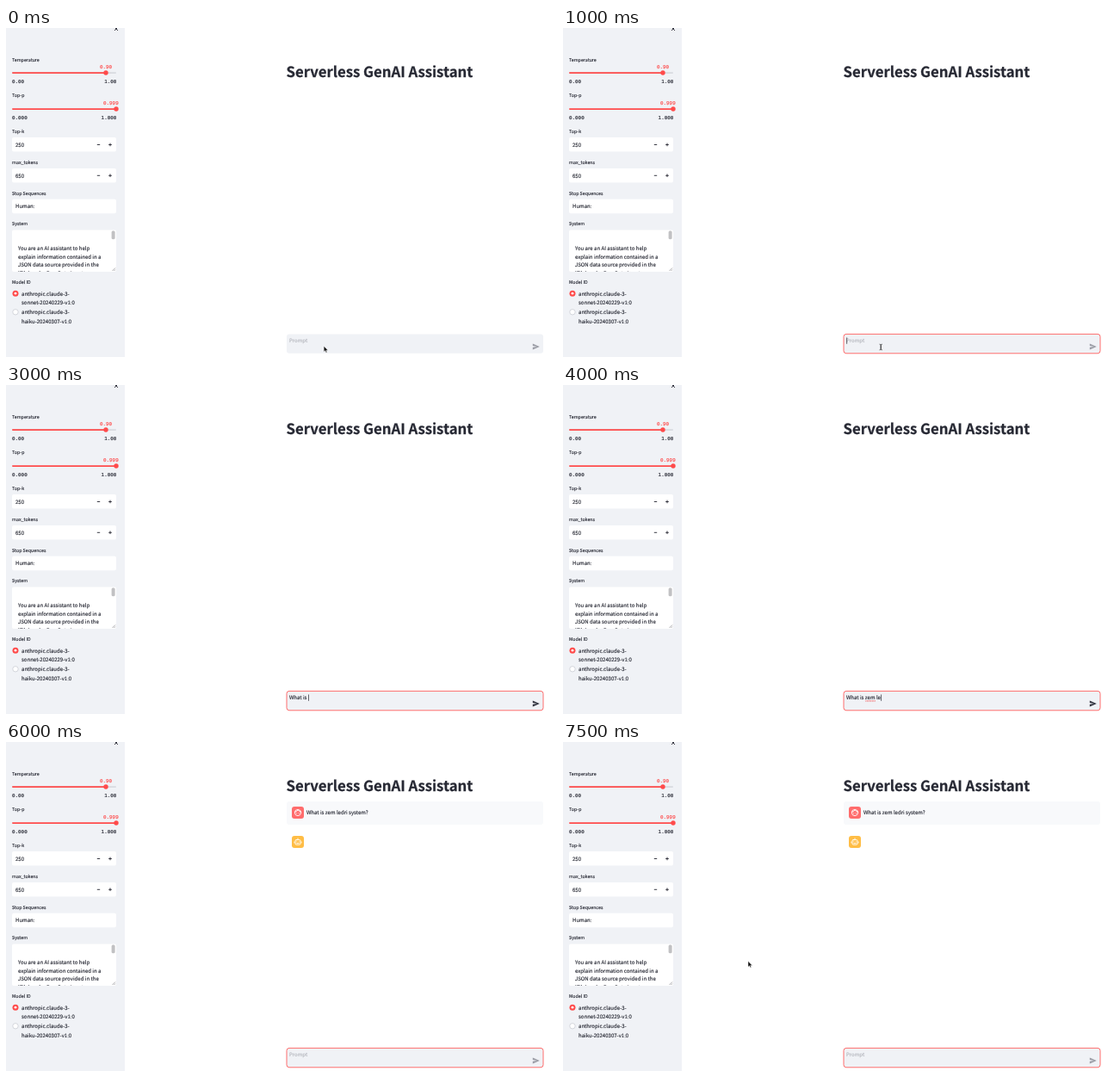
Write an HTML page that moves like this. It is 640x382 px and loops after 8000 ms.

```html
<!DOCTYPE html>
<html lang="en">
<head>
<meta charset="utf-8">
<title>Serverless GenAI Assistant</title>
<style>
  html, body { margin: 0; width: 100%; height: 100%; overflow: hidden; background: #fff; }
  svg { display: block; width: 100%; height: 100%; }
  text {
    font: 6.06px "Noto Sans CJK JP", "Noto Sans CJK SC", "Noto Sans CJK", "Open Sans", sans-serif;
    fill: #262833;
    stroke: #262833;
    stroke-width: .14;
    text-rendering: geometricPrecision;
    white-space: pre;
  }
  .title { font-size: 16.75px; font-weight: 700; letter-spacing: -.02px; stroke-width: .25; }
  .label text { font-size: 5.3px; }
  .num text { font: 5.9px "Liberation Mono", "Noto Sans Mono", monospace; }
  .num .hot { fill: #ff4b4b; stroke: #ff4b4b; }
  .end { text-anchor: end; }
  .panel { fill: #f0f2f6; }
  .field { fill: #fff; }
  .red { fill: #ff4b4b; }
  .sign { stroke: #262833; stroke-width: .9; fill: none; }
  .face { stroke: #fff; stroke-width: .9; fill: none; stroke-linecap: round; }
  .hint { fill: #a0a2aa; stroke: none; }
</style>
</head>
<body>
<svg viewBox="0 0 640 382" xmlns="http://www.w3.org/2000/svg">
  <defs>
    <clipPath id="area"><rect x="7" y="234.5" width="121" height="48.5"/></clipPath>
    <path id="arrow" d="M0 0V6.6L1.6 5.2 2.6 7.5 3.7 7 2.7 4.8H4.8Z" fill="#111" stroke="#fff" stroke-width=".4"/>
  </defs>

  <!-- sidebar -->
  <rect class="panel" width="138" height="382"/>
  <path class="sign" d="M126 -1l4 4M130 -1l-4 4"/>
  <g class="label">
    <text x="7" y="38.6">Temperature</text>
    <text x="7" y="80.1">Top-p</text>
    <text x="7" y="121.9">Top-k</text>
    <text x="7" y="157.8">max_tokens</text>
    <text x="7" y="193.8">Stop Sequences</text>
    <text x="7" y="229.3">System</text>
    <text x="7" y="297.3">Model ID</text>
  </g>

  <rect x="7" y="51.2" width="121" height="1.7" rx=".8" fill="#d8dae0"/>
  <rect class="red" x="7" y="51.2" width="109" height="1.7" rx=".8"/>
  <circle class="red" cx="116" cy="52" r="2.7"/>
  <rect class="red" x="7" y="93.2" width="121" height="1.7" rx=".8"/>
  <circle class="red" cx="128" cy="94" r="2.7"/>
  <g class="num">
    <text class="hot" x="109" y="47.2">0.90</text>
    <text x="7" y="63.8">0.00</text>
    <text class="end" x="128.3" y="63.8">1.00</text>
    <text class="hot" x="113" y="89">0.999</text>
    <text x="7" y="105.8">0.000</text>
    <text class="end" x="128.3" y="105.8">1.000</text>
  </g>

  <g class="field">
    <rect x="7" y="127" width="121" height="16.5" rx="2"/>
    <rect x="7" y="163" width="121" height="16.5" rx="2"/>
    <rect x="7" y="198.7" width="121" height="16.5" rx="2"/>
    <rect x="7" y="234.5" width="121" height="48.5" rx="2"/>
  </g>
  <text x="11" y="137.8">250</text>
  <text x="11" y="173.7">650</text>
  <text x="11" y="209.4">Human:</text>
  <path class="sign" d="M105.8 135.5h3.4M119.2 135.5h3.6M121 133.7v3.6M105.8 171.3h3.4M119.2 171.3h3.6M121 169.5v3.6"/>

  <g clip-path="url(#area)">
    <text x="14" y="258.2">You are an AI assistant to help</text>
    <text x="14" y="267.8">explain information contained in a</text>
    <text x="14" y="277.4">JSON data source provided in the</text>
    <text x="14" y="286.6">'File' under Raw Data Input</text>
  </g>
  <rect x="122.6" y="235.6" width="4" height="9.6" rx="1.5" fill="#c1c1c3"/>
  <path d="M123.5 282l3.5-3.5M125.5 282l1.5-1.5" stroke="#77787c" stroke-width=".6"/>

  <circle class="red" cx="11" cy="308.2" r="3.5"/>
  <circle class="field" cx="11" cy="308.2" r="1.4"/>
  <circle class="field" cx="11" cy="329.8" r="3.2" stroke="#c3c6ce" stroke-width=".7"/>
  <text x="18" y="310.7">anthropic.claude-3-</text>
  <text x="18" y="321.3">sonnet-20240229-v1:0</text>
  <text x="18" y="332.2">anthropic.claude-3-</text>
  <text x="18" y="342.8">haiku-20240307-v1:0</text>

  <!-- conversation -->
  <text class="title" x="325.6" y="56.8">Serverless GenAI Assistant</text>
  <g id="chat">
    <rect x="326" y="69" width="298" height="27" rx="3" fill="#f8f9fb"/>
    <rect x="332" y="75" width="14" height="14" rx="3" fill="#ff6c6c"/>
    <g class="face">
      <circle cx="339" cy="82" r="3.6"/>
      <path d="M335.6 81.2q2.4 0 3.4-2.4 1 2 3.4 2M337.7 82.7v.1M340.3 82.7v.1"/>
    </g>
    <rect x="332" y="109" width="14" height="14" rx="3" fill="#ffbd45"/>
    <g class="face">
      <rect x="336" y="113.6" width="6" height="5.6" rx="1.2"/>
      <path d="M339 112v1.4M335 116v1M343 116v1M337.8 115.7v.1M340.2 115.7v.1M337.8 117.6h2.4"/>
    </g>
    <text id="sent" x="349" y="84"></text>
  </g>

  <!-- prompt box -->
  <rect class="panel" id="box" x="326" y="355.4" width="298" height="22.4" rx="3" stroke-width=".8"/>
  <text class="hint" id="hint" x="329" y="365.4">Prompt</text>
  <text id="typed" x="329" y="365.4"></text>
  <path id="squiggle" d="M351.3 366.9h11.6" stroke="#ee3b3b" stroke-width=".9" stroke-dasharray="1 .5"/>
  <rect id="caret" y="359.4" width=".7" height="7.4" fill="#262833"/>
  <path id="send" d="M611.8 366.4l8 3.5-8 3.5v-2.7l5-.8-5-.8z"/>

  <use id="pointer" href="#arrow"/>
  <path id="beam" d="M367.6 367.2q1.6 0 1.6 1v4.6q0 1-1.6 1M370.8 367.2q-1.6 0-1.6 1v4.6q0 1 1.6 1" fill="none" stroke="#222" stroke-width=".7"/>
</svg>
<script>
  const LOOP = 8000, TICK = 500;
  const QUESTION = "What is zem ledri system?";
  // letters typed at each tick, counted from 2000 ms
  const LETTERS = [1, 4, 8, 11, 14, 18, 22, 25];
  const $ = id => document.getElementById(id);
  const show = (id, on) => $(id).style.display = on ? "" : "none";

  $("sent").textContent = QUESTION;

  function draw(tick) {
    const count = LETTERS[tick - 4] || 0;
    const focused = tick >= 2;
    const answered = tick >= 12;

    $("typed").textContent = QUESTION.slice(0, count);
    show("hint", !count);
    show("squiggle", count > 11);
    $("box").setAttribute("stroke", focused ? "#ff4b4b" : "none");
    $("send").setAttribute("fill", count ? "#31333f" : "#9a9ca5");

    show("caret", count || tick === 2);
    $("caret").setAttribute("x", 329.4 + (count ? $("typed").getComputedTextLength() : 0));

    show("chat", answered);
    show("beam", tick === 2 || tick === 3);
    show("pointer", !focused || tick === 15);
    $("pointer").setAttribute("transform", focused ? "translate(215 254.6)" : "translate(369.2 369.4)");
  }

  const start = performance.now();
  let last = -1;
  function loop() {
    const tick = Math.floor((performance.now() - start) % LOOP / TICK);
    if (tick !== last) draw(tick);
    last = tick;
    requestAnimationFrame(loop);
  }
  loop();
</script>
</body>
</html>
```
